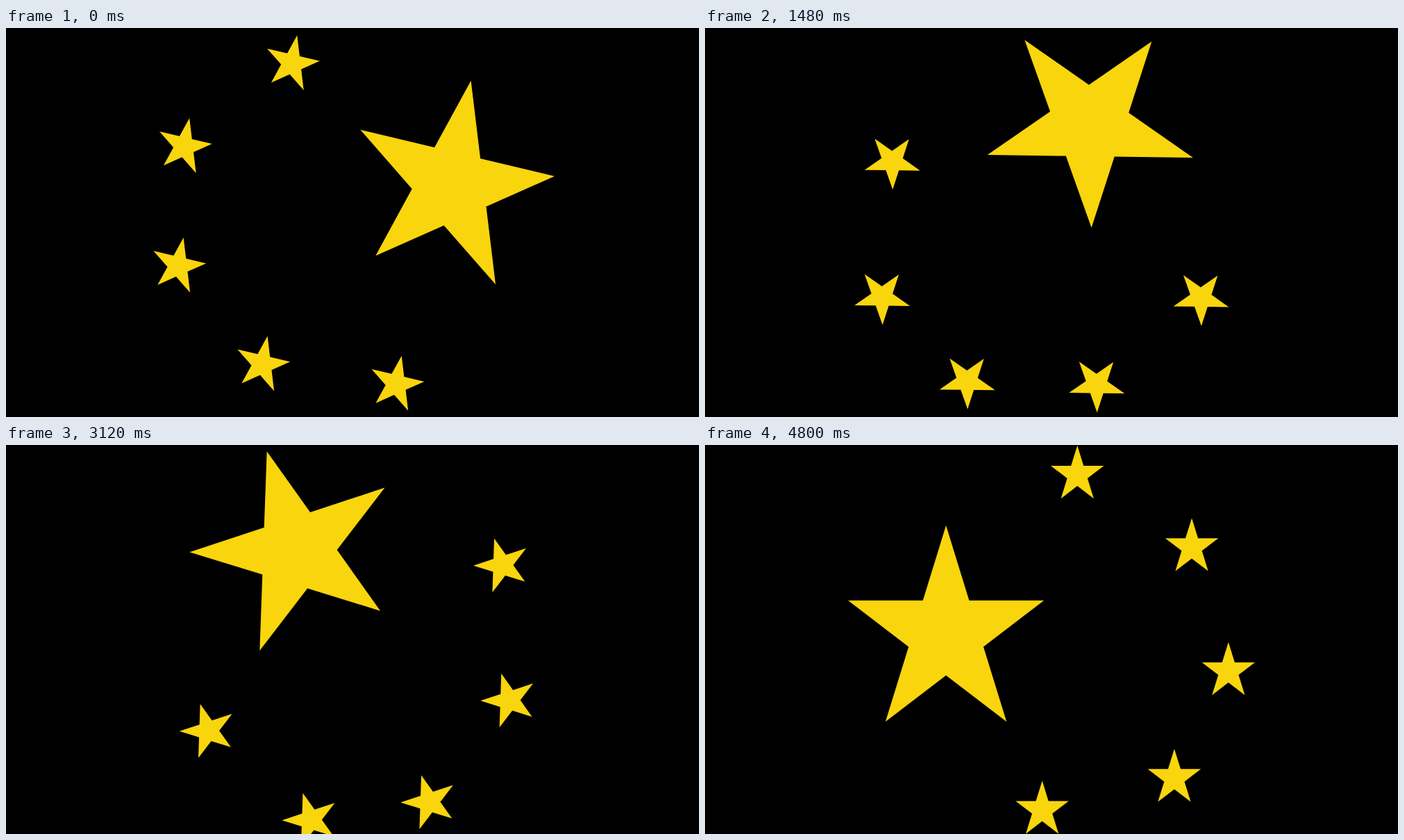
Recreate the animation shown at these times as an HTML page. Size 998 by 561 pixels, loop 5 s.

```html
<!DOCTYPE html>
<html lang="en">
<head>
<meta charset="utf-8">
<title>Turning stars</title>
<style>
html, body { margin: 0; width: 100%; height: 100%; overflow: hidden; background: #000; }
svg { display: block; width: 100%; height: 100%; }
</style>
</head>
<body>
<svg viewBox="0 0 998 561" preserveAspectRatio="none">
  <rect width="998" height="561" fill="#000"/>
  <g id="stars" fill="#f9d50d"></g>
</svg>
<script>
const LOOP = 5000, STEP = 40, LAST = 120, TURN = 1.3;
const CENTER = '499.1 281';
const group = document.getElementById('stars');

// Five-pointed star, slightly taller than wide.
function starPoints(cx, cy, rx, ry) {
  const inner = (3 - Math.sqrt(5)) / 2;
  return Array.from({ length: 10 }, (_, i) => {
    const a = i * Math.PI / 5, r = i % 2 ? inner : 1;
    return (cx + rx * r * Math.sin(a)).toFixed(2) + ',' + (cy - ry * r * Math.cos(a)).toFixed(2);
  }).join(' ');
}

function addStar(x, y, rx, ry) {
  const star = document.createElementNS('http://www.w3.org/2000/svg', 'polygon');
  star.setAttribute('points', starPoints(x, y, rx, ry));
  group.appendChild(star);
}

// Positions are relative to the centre of rotation.
addStar(-152, -8.5, 148.3, 156.4);
[[37.1, -238], [201.9, -133.4], [254.7, 45.5], [176.8, 199.4], [-13.5, 245.5]]
  .forEach(([x, y]) => addStar(x, y, 40.2, 42.2));

function draw(ms) {
  const step = Math.min(LAST, Math.floor(ms % LOOP / STEP));
  const angle = (LAST - step) * TURN;
  group.setAttribute('transform', `translate(${CENTER}) rotate(${angle})`);
}

const start = performance.now();
function tick() {
  draw(performance.now() - start);
  requestAnimationFrame(tick);
}
draw(0);
requestAnimationFrame(tick);
</script>
</body>
</html>
```
